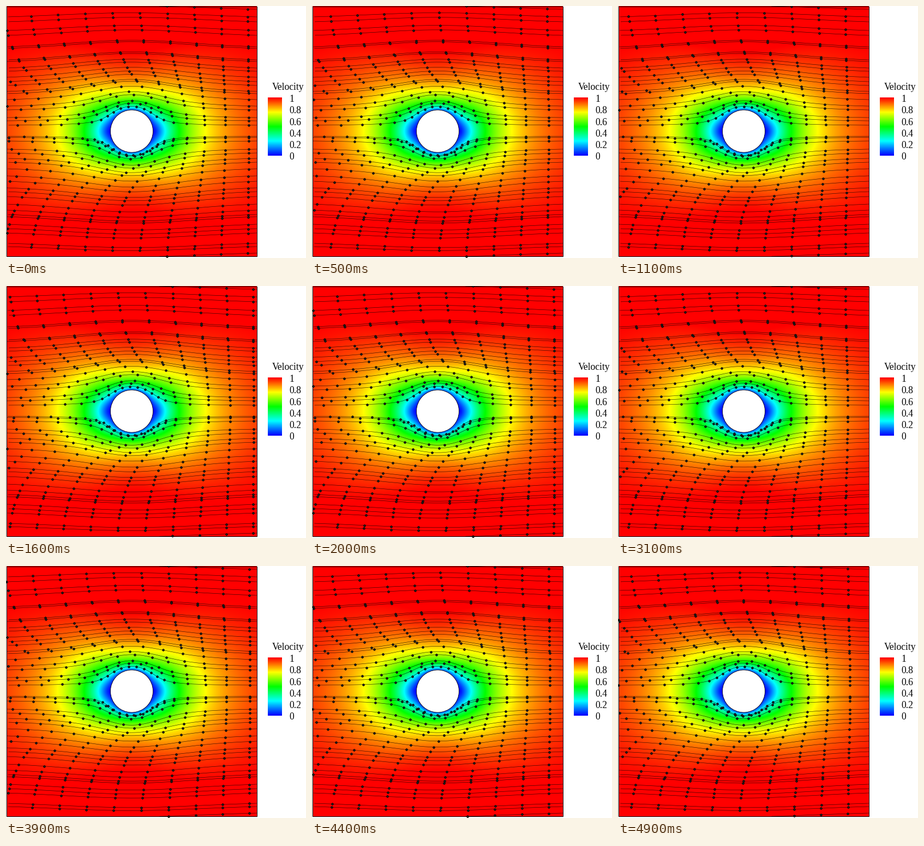
Write a matplotlib script that moves like this. It is 550x463 px and loops after 5 s.

```python
import numpy as np
import matplotlib.pyplot as plt
from matplotlib.animation import FuncAnimation
from matplotlib.colors import LinearSegmentedColormap
from matplotlib.patches import Circle, Rectangle

W, H, DPI = 550, 463, 100
LEFT, RIGHT, BOTTOM = 1, 460, 460
CX, CY, BALL = 230.5, 230, 39
CORE = 37.5            # effective radius for the flow
OUTER = 390 / CORE     # radius where the flow is uniform again
PERIOD_PX = 48         # free-stream travel between two releases
STEPS = 100            # integration steps per release
PHASE = 33
FRAMES, CYCLE = 50, 20

SEEDS = np.array([
    6, 20, 29, 45, 54, 75, 78, 99, 102, 114, 120, 131, 139, 146, 157, 161,
    172, 184, 191, 205, 211, 219,
    239.5, 241.5, 248, 263, 270, 280, 287, 299, 312, 322, 334, 341, 350, 364,
    375, 383, 387, 401, 409, 417, 436, 442, 454], float)


def radial(r):
    return np.array([np.ones_like(r), 1 / r, 1 / r**3, r**2])


def tangential(r):
    return np.array([np.ones_like(r), 0.5 / r, -0.5 / r**3, 2 * r**2])


# Creeping flow: at rest on the sphere, unit speed on the outer shell.
one, far = np.float64(1), np.float64(OUTER)
COEF = np.linalg.solve(
    [radial(one), tangential(one), radial(far), tangential(far)], [0, 0, 1, 1])


def velocity(x, y):
    """Flow towards the left, in free-stream units."""
    dx, dy = (x - CX) / CORE, (y - CY) / CORE
    dist = np.maximum(np.hypot(dx, dy), 1e-6)
    c, s = dx / dist, dy / dist
    r = np.maximum(dist, 1)
    ur = np.tensordot(COEF, radial(r), 1) * c
    ut = -np.tensordot(COEF, tangential(r), 1) * s
    return -(ur * c - ut * s), -(ur * s + ut * c)


def trace(seeds, releases=32):
    h = PERIOD_PX / STEPS
    pos = np.array([np.full(len(seeds), RIGHT - 0.5), seeds])
    path = [pos]
    for _ in range(releases * STEPS):
        k1 = np.array(velocity(*pos))
        k2 = np.array(velocity(*(pos + h / 2 * k1)))
        pos = pos + h * k2
        outside = (pos[0] < LEFT) | (pos[1] < 0) | (pos[1] > BOTTOM)
        pos = np.where(outside, np.nan, pos)
        path.append(pos)
    return np.array(path)


paths = trace(SEEDS)
rainbow = LinearSegmentedColormap.from_list(
    "rainbow5", ["#0000ff", "#00ffff", "#00ff00", "#ffff00", "#ff0000"], 512)

fig = plt.figure(figsize=(W / DPI, H / DPI), dpi=DPI, facecolor="white")
ax = fig.add_axes([0, 0, 1, 1])

gx, gy = np.meshgrid(np.arange(LEFT, RIGHT) + 0.5, np.arange(BOTTOM) + 0.5)
speed = np.hypot(*velocity(gx, gy))
ax.imshow(speed, cmap=rainbow, vmin=0, vmax=1,
          extent=(LEFT, RIGHT, BOTTOM, 0), interpolation="nearest")
ax.imshow(np.linspace(1, 0, 107)[:, None], cmap=rainbow, vmin=0, vmax=1,
          extent=(480, 506, 275.5, 168.5), aspect="auto",
          interpolation="nearest")

ax.plot(paths[::10, 0], paths[::10, 1], color="black", lw=0.45, alpha=0.85)
ax.add_patch(Circle((CX, CY), BALL, fc="white", ec="black", lw=0.6, zorder=3))
ax.add_patch(Rectangle((LEFT, 0.5), RIGHT - LEFT - 0.5, BOTTOM - 1,
                       fill=False, ec="black", lw=0.7, zorder=3))

font = dict(family="Liberation Serif", size=12.7, color="black")
ax.text(488, 154.5, "Velocity", **font)
for i, label in enumerate(["1", "0.8", "0.6", "0.4", "0.2", "0"]):
    ax.text(519.5, 176 + 21.3 * i, label, **font)

dots, = ax.plot([], [], "o", ms=2.7, mfc="#1c1c1c", mec="black", mew=0.5,
                zorder=4)
ax.set_xlim(0, W)
ax.set_ylim(H, 0)
ax.set_aspect("auto")
ax.axis("off")


def update(frame):
    start = PHASE + frame % CYCLE * STEPS // CYCLE
    now = paths[start % STEPS::STEPS]
    dots.set_data(now[:, 0].ravel(), now[:, 1].ravel())
    return dots,


anim = FuncAnimation(fig, update, frames=FRAMES, interval=100, repeat=True,
                     repeat_delay=0)
plt.show()
```
